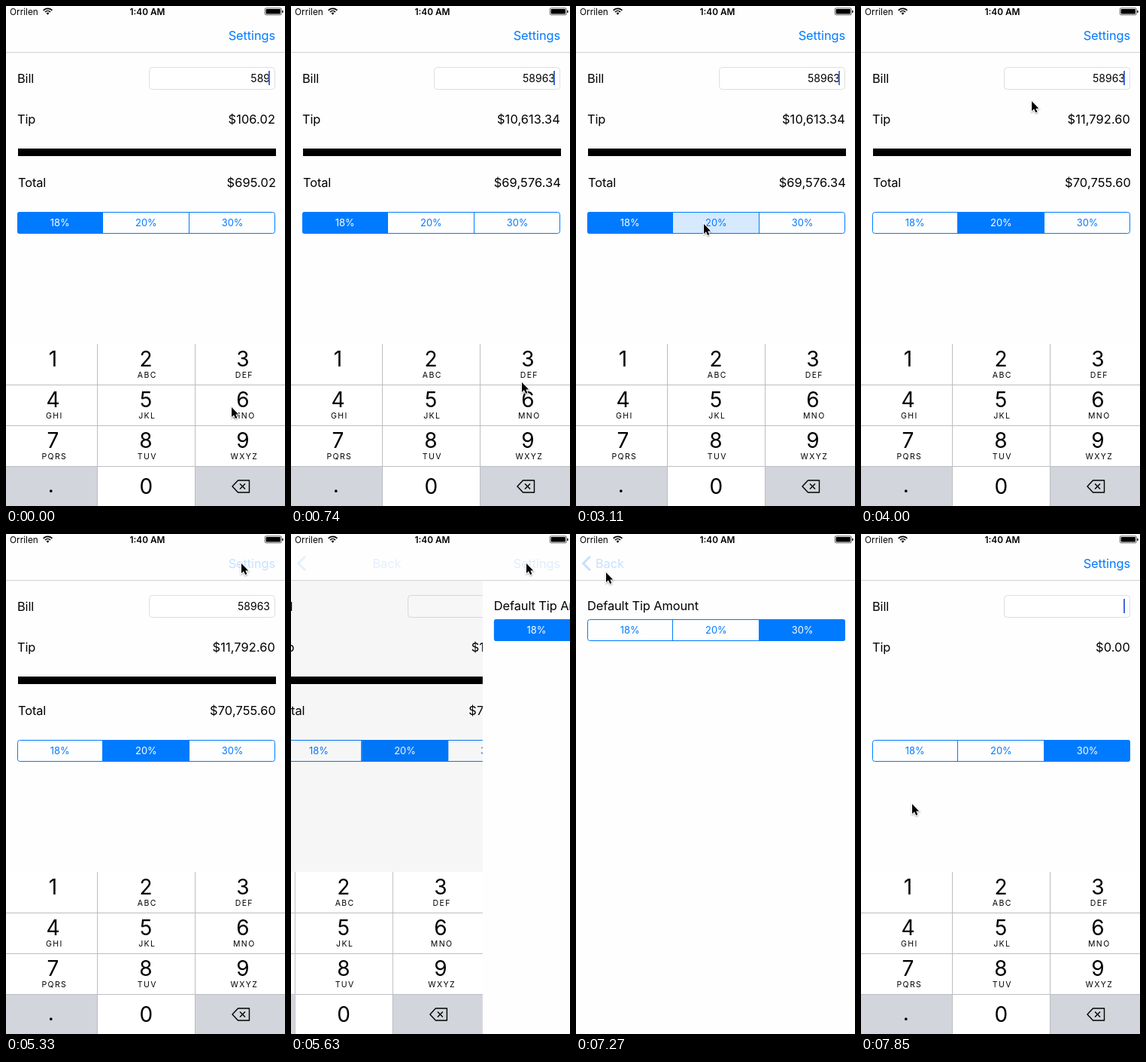
Write an HTML page with a canvas that moves like this. It is 371 px wide and 663 px high and loops after 8000 ms.

```html
<!DOCTYPE html>
<html lang="en">
<head>
<meta charset="utf-8">
<title>Tip calculator</title>
<style>
html, body { margin: 0; width: 100%; height: 100%; overflow: hidden; background: #fefefe; }
canvas { display: block; width: 371px; height: 663px; }
</style>
</head>
<body>
<canvas id="stage"></canvas>
<script>
const W = 371, H = 663, LOOP = 8000, STEPS = 54;
const BLUE = '#007aff', PAPER = '#fefefe', GREY = '#d2d5db';
const FONT = 'Inter, Roboto, "Liberation Sans", sans-serif';
const RATES = [18, 20, 30];
const LETTERS = ['', 'ABC', 'DEF', 'GHI', 'JKL', 'MNO', 'PQRS', 'TUV', 'WXYZ'];
const COLUMNS = [0, 121, 251, W], MIDDLES = [62.5, 186, 315];
const PAD_TOP = 448, ROW = 54;

// Steps at which something happens
const TYPE_6 = 2, TYPE_3 = 5, PICK_20 = 22, TAP_SETTINGS = 36, OPEN = 38;
const PICK_30 = 46, TAP_BACK = 49, CLOSE = 50, SLIDE = 3;

// Pointer moves; it rests in between
const HOME = { x: 300, y: 532 };
const MOVES = [
  { from: 2, to: 4, x: 307, y: 499 },
  { from: 6, to: 9, x: 204, y: 648 },
  { from: 9, to: 17, x: 337, y: 33 },
  { from: 17, to: 21, x: 170, y: 289 },
  { from: 22, to: 24, x: 69, y: 287 },
  { from: 24, to: 29, x: 313, y: 39 },
  { from: 42, to: 43, x: 284, y: 133 },
  { from: 46, to: 48, x: 40, y: 51 },
  { from: 51, to: 53, x: 68, y: 358 }
];

const canvas = document.getElementById('stage');
const ctx = canvas.getContext('2d');
const dpr = window.devicePixelRatio || 1;
canvas.width = W * dpr;
canvas.height = H * dpr;

const clamp = v => Math.max(0, Math.min(1, v));
const smooth = v => v * v * (3 - 2 * v);
const money = v => '$' + v.toLocaleString('en-US', { minimumFractionDigits: 2, maximumFractionDigits: 2 });

function layer(draw, { x = 0, alpha = 1 } = {}) {
  ctx.save();
  ctx.translate(x, 0);
  ctx.globalAlpha *= alpha;
  draw();
  ctx.restore();
}

function rect(x, y, w, h, color) {
  ctx.fillStyle = color;
  ctx.fillRect(x, y, w, h);
}

function text(str, x, y, { size = 16.4, color = '#000', align = 'left', weight = 400, spacing = -0.1 } = {}) {
  ctx.font = `${weight} ${size}px ${FONT}`;
  ctx.letterSpacing = spacing + 'px';
  ctx.textAlign = align;
  ctx.fillStyle = color;
  ctx.fillText(str, x, y);
}

function line(points, color, width, closed) {
  ctx.beginPath();
  points.forEach(([x, y]) => ctx.lineTo(x, y));
  if (closed) ctx.closePath();
  ctx.strokeStyle = color;
  ctx.lineWidth = width;
  ctx.stroke();
}

function box(x, y, w, h, r, { fill, stroke, width = 1 }) {
  ctx.beginPath();
  ctx.roundRect(x, y, w, h, r);
  if (fill) {
    ctx.fillStyle = fill;
    ctx.fill();
  }
  if (stroke) {
    ctx.strokeStyle = stroke;
    ctx.lineWidth = width;
    ctx.stroke();
  }
}

function wifi(x, y) {
  const arc = r => ctx.arc(x, y, r, -Math.PI * 0.76, -Math.PI * 0.24);
  ctx.strokeStyle = ctx.fillStyle = '#000';
  ctx.lineWidth = 1.7;
  for (const r of [4.8, 8]) {
    ctx.beginPath();
    arc(r);
    ctx.stroke();
  }
  ctx.beginPath();
  ctx.moveTo(x, y + 0.5);
  arc(2.6);
  ctx.fill();
}

function statusBar() {
  text('Orrilen', 5, 11.5, { size: 11.8, spacing: 0 });
  text('1:40 AM', 188, 11.5, { size: 11.8, weight: 600, align: 'center', spacing: 0 });
  wifi(55.5, 11.3);
  box(344.3, 2.8, 22, 9, 1.6, { stroke: '#000', width: 0.6 });
  box(345.6, 4.1, 19.4, 6.4, 0.8, { fill: '#000' });
  box(367.2, 5.7, 1.4, 3.4, [0, 1, 1, 0], { fill: '#000' });
}

function segments(y, selected, pressed) {
  const edge = i => Math.round(14.7 + i * 114.4);
  const fill = (i, color) => rect(edge(i), y, edge(i + 1) - edge(i), 29, color);
  ctx.save();
  ctx.beginPath();
  ctx.roundRect(15, y, 343, 29, 3);
  ctx.clip();
  if (pressed >= 0) fill(pressed, '#d6e9fd');
  fill(selected, BLUE);
  ctx.restore();
  rect(128, y, 1, 29, BLUE);
  rect(243, y, 1, 29, BLUE);
  box(15.5, y + 0.5, 342, 28, 3, { stroke: BLUE });
  RATES.forEach((rate, i) => text(rate + '%', 71.7 + i * 114.7, y + 19,
    { size: 12.9, align: 'center', spacing: 0, color: i === selected ? '#fff' : BLUE }));
}

function row(label, value, x, right, y) {
  text(label, x, y);
  text(money(value), right, y, { align: 'right', spacing: 0.1 });
}

function billScreen(s) {
  rect(0, 62, W, H - 62, PAPER);
  text('Bill', 15, 102);
  box(190.5, 81.5, 167, 29, 4, { fill: '#fff', stroke: '#dedede' });
  text(s.bill, 351, 101, { size: 14, align: 'right', spacing: 0 });
  layer(() => rect(349, 86, 2, 19, '#4169d8'), { alpha: s.caret });

  const bill = Number(s.bill), tip = bill * RATES[s.rate] / 100;
  row('Tip', tip, 15, 358, 156);
  if (bill) {
    rect(16, 189, 343, 10, '#000');
    row('Total', bill + tip, 16, 359, 240);
  }
  segments(273, s.rate, s.hotRate);
}

function backspace(x, y) {
  ctx.lineJoin = 'round';
  line([[x - 11, y], [x - 3.5, y - 8], [x + 11.5, y - 8], [x + 11.5, y + 8], [x - 3.5, y + 8]], '#000', 1.4, true);
  for (const d of [-3.5, 3.5]) line([[x - 1, y - d], [x + 6, y + d]], '#000', 1.4);
  ctx.lineJoin = 'miter';
}

function keypad(hotKey) {
  const bottom = PAD_TOP + 3 * ROW;
  const big = { size: 28, align: 'center', spacing: 0 };
  rect(0, PAD_TOP, W, H - PAD_TOP, '#fff');
  rect(0, bottom, 121, H - bottom, GREY);
  rect(251, bottom, 120, H - bottom, GREY);
  LETTERS.forEach((letters, i) => {
    const col = i % 3, y = PAD_TOP + Math.floor(i / 3) * ROW, x = MIDDLES[col];
    if (i + 1 === hotKey) rect(COLUMNS[col], y, COLUMNS[col + 1] - COLUMNS[col], ROW, GREY);
    text(i + 1, x, y + 30, big);
    text(letters, x + 1.8, y + 45, { size: 10.5, align: 'center', spacing: 1.4 });
  });
  text('0', 186.3, bottom + 37, big);
  text('.', 59.8, bottom + 35, big);
  for (let i = 1; i < 4; i++) rect(0, PAD_TOP + i * ROW, W, 1, '#bcbec2');
  for (const x of COLUMNS.slice(1, 3)) rect(x, PAD_TOP, 1, H - PAD_TOP, '#bcbec2');
  backspace(312, 637);
}

function settingsScreen(s) {
  rect(0, 62, W, H - 62, PAPER);
  text('Default Tip Amount', 15, 101);
  segments(113, s.defaultRate, s.hotDefault);
}

function navBar(s) {
  rect(0, 0, W, 61, PAPER);
  rect(0, 61, W, 1, '#d3d3d3');
  statusBar();
  const p = s.push, dim = hot => hot ? 0.22 : 1;
  const back = clamp(p * 1.3 - 0.3) * dim(s.hotBack);
  layer(() => text('Settings', 358, 45, { align: 'right', color: BLUE }),
    { alpha: clamp(1 - p * 1.3) * dim(s.hotSettings) });
  layer(() => line([[19, 29.8], [9.7, 39], [19, 48.2]], BLUE, 3), { alpha: back });
  layer(() => text('Back', 26, 45, { color: BLUE }), { alpha: back, x: (1 - p) * 120 });
}

function pointer(step) {
  const at = MOVES.reduce((pos, m) => {
    const f = smooth(clamp((step - m.from) / (m.to - m.from)));
    return { x: pos.x + (m.x - pos.x) * f, y: pos.y + (m.y - pos.y) * f };
  }, HOME);
  ctx.save();
  ctx.translate(at.x, at.y);
  ctx.shadowColor = 'rgba(0,0,0,.35)';
  ctx.shadowBlur = 2 * dpr;
  ctx.shadowOffsetY = dpr;
  line([[0, 0], [0, 13], [3, 10.3], [5.2, 15], [7.4, 14], [5.3, 9.6], [9.2, 9.4]], '#fff', 2, true);
  ctx.shadowColor = 'transparent';
  ctx.fillStyle = '#000';
  ctx.fill();
  ctx.restore();
}

function caretAlpha(step, t) {
  if (step < 7 || step >= CLOSE) return 1;
  const phase = (t + 500) % 1000;
  return clamp(phase / 190) * clamp((790 - phase) / 200);
}

// Share of a screen slide done, easing out
function slide(step, begin) {
  if (step < begin) return 0;
  const u = clamp((step - begin + 0.4) / (SLIDE + 0.4));
  return 1 - (1 - u) ** 3;
}

function stateAt(step, t) {
  const returned = step >= CLOSE;
  return {
    bill: returned ? '' : '589' + (step >= TYPE_6 ? '6' : '') + (step >= TYPE_3 ? '3' : ''),
    hotKey: step === TYPE_6 - 1 ? 6 : step === TYPE_3 - 1 ? 3 : 0,
    rate: returned ? 2 : step < PICK_20 ? 0 : 1,
    hotRate: step === PICK_20 - 1 ? 1 : -1,
    defaultRate: step < PICK_30 ? 0 : 2,
    hotDefault: step === PICK_30 - 1 ? 2 : -1,
    hotSettings: step >= TAP_SETTINGS && step < OPEN + SLIDE,
    hotBack: step >= TAP_BACK,
    caret: caretAlpha(step, t),
    push: slide(step, OPEN) - slide(step, CLOSE)
  };
}

function draw(now) {
  // The screen advances in even steps
  const step = Math.floor((now % LOOP + 5) / LOOP * STEPS) % STEPS;
  const s = stateAt(step, step * LOOP / STEPS), p = s.push;
  ctx.setTransform(dpr, 0, 0, dpr, 0, 0);
  rect(0, 0, W, H, PAPER);
  if (p < 1) {
    layer(() => {
      billScreen(s);
      rect(0, 62, W, H - 62, `rgba(0,0,0,${0.1 * p})`);
    }, { x: -0.3 * W * p });
  }
  if (p > 0) layer(() => settingsScreen(s), { x: W * (1 - p) });
  if (p < 1) layer(() => keypad(s.hotKey), { x: -W * p });
  navBar(s);
  pointer(step);
}

const start = performance.now();
function tick() {
  draw(performance.now() - start);
  requestAnimationFrame(tick);
}
tick();
</script>
</body>
</html>
```
